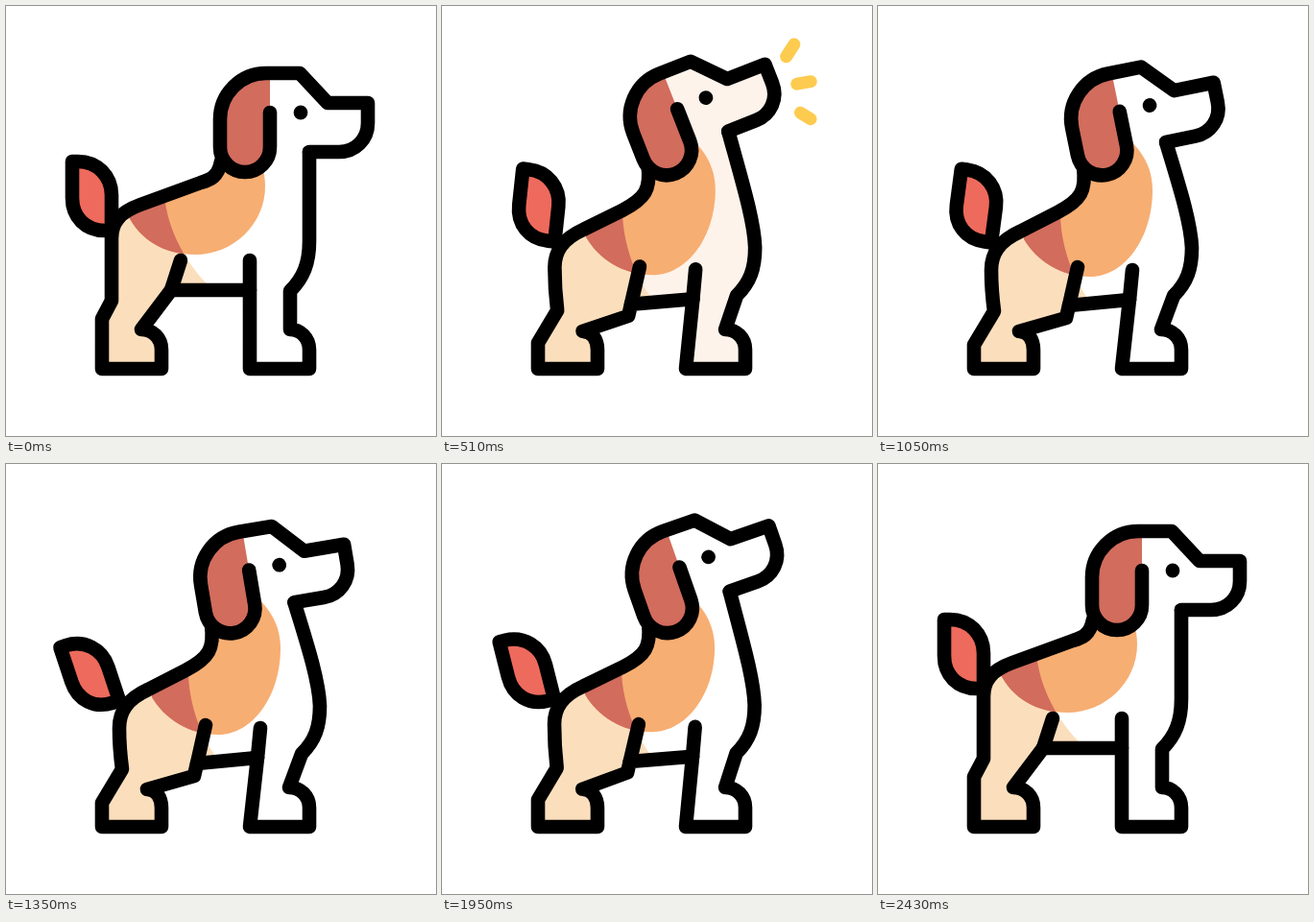
An HTML page that plays this animation: 448x448 px, repeating every 3.6 s.

```html
<!DOCTYPE html>
<html lang="en">
<head>
<meta charset="utf-8">
<title>Barking dog</title>
<style>
html, body { margin: 0; width: 100%; height: 100%; overflow: hidden; background: #fff; }
svg { display: block; width: 100%; height: 100%; }
.ink { fill: none; stroke: #000; stroke-width: 14.6; stroke-linecap: round; stroke-linejoin: round; }
.ray { stroke: #fdcb4f; stroke-width: 13; stroke-linecap: round; }
</style>
</head>
<body>
<svg viewBox="0 0 448 448">
  <defs><clipPath id="inside"><path id="clip"/></clipPath></defs>

  <g id="tail">
    <path class="ink" style="fill:#ee6a5c" d="M69 162H75C95 162 110 177 110 197V234H103C83 234 69 220 69 200Z"/>
  </g>

  <path id="coat"/>
  <g clip-path="url(#inside)">
    <path id="rear" fill="#fbdfbd"/>
    <path id="saddle" fill="#f7ae72"/>
    <g clip-path="url(#rearClip)"><path id="overlap" fill="#d26c5d"/></g>
  </g>
  <clipPath id="rearClip"><path id="rearShape"/></clipPath>
  <path id="outline" class="ink"/>
  <path id="legs" class="ink"/>

  <g id="head">
    <path id="face" d="M275 111V70H306L335 101H377V122C377 139 364 152 347 152H316Z"/>
    <path fill="#d26c5d" d="M275 70V147A26 26 0 0 1 223 147V118A48 48 0 0 1 271 70Z"/>
    <path class="ink" d="M275 111V147A26 26 0 0 1 223 147V118A48 48 0 0 1 271 70H306L335 101H377V122C377 139 364 152 347 152H316"/>
    <circle cx="307" cy="111" r="7.4"/>
  </g>

  <g id="bark">
    <line class="ray"/><line class="ray"/><line class="ray"/>
  </g>
</svg>

<script>
const LOOP = 3600, STEP = 30, END = 2430;
const $ = id => document.getElementById(id);

// Each shape: standing pose, stretched pose. Numbers are blended pairwise.
const shapes = {
  back: [
    'M224 162C221 178 213 181 203 184L140 207C118 215 110 226 110 242C110 264 110 286 110 307L100 326L100 378L162 378L162 358C162 346 153 337 141 337L172 296L172 296L254 296L254 378L316 378L316 358C316 346 307 337 296 337L296 297C310 283 316 268 316 245',
    'M214 168C217 192 212 202 187 215L148 235C126 245 118 258 118 275C118 290 119 303 121 318L100 353L100 378L162 378L162 358C162 348 157 339 147 339L196 325L199 312L262 306L254 378L316 378L316 358C316 346 307 337 295 337L308 302C322 288 327 274 327 252'
  ],
  chest: ['C316 214 316 183', 'C326 225 313 185'],
  legs: [
    'M182 265L172 296M254 265L254 296',
    'M208 272L199 312M265 275L262 306'
  ],
  rear: [
    'M165 185L165 195C167 232 188 270 215 295L215 400L60 400L60 185Z',
    'M190 200L190 212C189 245 202 285 222 309L222 400L60 400L60 200Z'
  ],
  saddle: [
    'M230 122C254 133 270 160 270 188C270 227 237 259 197 259C165 259 140 244 127 218L124 180Z',
    'M240 125C266 138 286 160 286 192C286 240 258 282 221 282C190 282 165 265 152 243L150 180Z'
  ]
};

const rays = [[356, 57, 384, 13], [365, 82, 414.5, 73.5], [370, 109, 406, 131.5]];
const barkStarts = [420, 1410];

// Keys: time, value
const pose = [[0, 0], [620, 1], [1810, 1], [END, 0]];
const nod = [[0, 0], [570, -22], [640, -22], [1200, -9.4], [1320, -9.4], [1740, -22], [1810, -22], [END, 0]];
const wag = [[0, 0], [280, -31], [535, 7], [780, -36], [1035, 8], [1260, -30],
             [1490, 5], [1740, -30], [1965, -14], [2210, -25], [END, 0]];

const lerp = (a, b, k) => a + (b - a) * k;
const ease = k => (1 - Math.cos(Math.PI * Math.min(1, Math.max(0, k)))) / 2;

function at(keys, t) {
  const i = keys.findIndex(key => key[0] > t);
  if (i < 0) return keys[keys.length - 1][1];
  const [t0, a] = keys[i - 1], [t1, b] = keys[i];
  return lerp(a, b, ease((t - t0) / (t1 - t0)));
}

function blend([a, b], k) {
  const to = b.match(/[\d.]+/g);
  let i = 0;
  return a.replace(/[\d.]+/g, n => lerp(+n, +to[i++], k).toFixed(2));
}

function place(id, x, y, angle, px, py) {
  $(id).setAttribute('transform', `translate(${x} ${y}) rotate(${angle}) translate(${-px} ${-py})`);
}

function setPath(d, ...ids) {
  ids.forEach(id => $(id).setAttribute('d', d));
}

function drawBark(t) {
  const start = barkStarts.find(s => t > s && t < s + 450);
  const on = start !== undefined;
  $('bark').style.display = on ? '' : 'none';
  const coat = on ? '#fdf3eb' : '#fff';
  $('coat').setAttribute('fill', coat);
  $('face').setAttribute('fill', coat);
  if (!on) return;
  const tail = ease((t - start) / 450), tip = ease((t - start) / 210);
  rays.forEach(([x0, y0, x1, y1], i) => {
    const line = $('bark').children[i];
    line.setAttribute('x1', lerp(x0, x1, tail));
    line.setAttribute('y1', lerp(y0, y1, tail));
    line.setAttribute('x2', lerp(x0, x1, tip));
    line.setAttribute('y2', lerp(y0, y1, tip));
  });
}

function draw(t) {
  const k = at(pose, t), angle = at(nod, t);
  const hx = lerp(249, 234, k), hy = lerp(150, 153.3, k);
  const c = Math.cos(angle * Math.PI / 180), s = Math.sin(angle * Math.PI / 180);
  const onHead = (x, y) => `${hx + (x - 249) * c - (y - 150) * s} ${hy + (x - 249) * s + (y - 150) * c}`;

  const outline = `${blend(shapes.back, k)}${blend(shapes.chest, k)} ${onHead(316, 152)}`;
  setPath(outline, 'outline');
  setPath(`${outline}L${onHead(275, 111)}Z`, 'coat', 'clip');
  setPath(blend(shapes.legs, k), 'legs');
  setPath(blend(shapes.rear, k), 'rear', 'rearShape');
  setPath(blend(shapes.saddle, k), 'saddle', 'overlap');

  place('head', hx, hy, angle, 249, 150);
  place('tail', lerp(110, 118, k), lerp(234, 246.5, k), at(wag, t), 110, 234);
  drawBark(t);
}

const began = performance.now();
function tick() {
  const t = (performance.now() - began) % LOOP;
  draw(Math.min(END, Math.floor(t / STEP) * STEP));
  requestAnimationFrame(tick);
}
tick();
</script>
</body>
</html>
```
